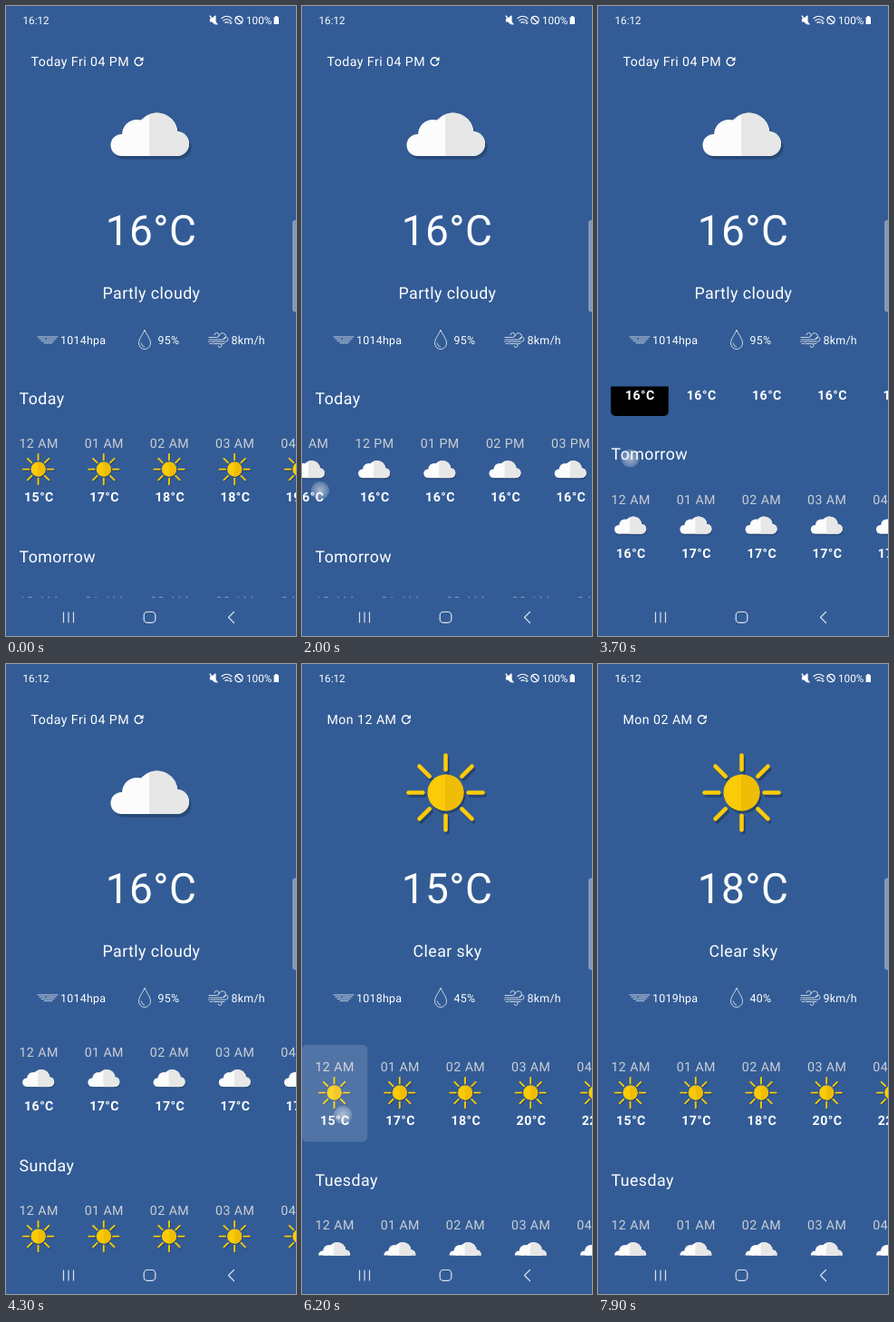
An HTML page for the animation above (8 s loop, 320 px wide and 693 px high).

```html
<!DOCTYPE html>
<html lang="en">
<head>
<meta charset="utf-8">
<title>Weather</title>
<style>
  html, body { margin: 0; width: 100%; height: 100%; overflow: hidden; background: #335c96; }
  svg { display: block; width: 100%; height: 100%; }
  text { font-family: Roboto, sans-serif; fill: #fff; letter-spacing: .44px; text-rendering: geometricPrecision; white-space: pre; }
  .mid { text-anchor: middle; }
  .hour { font-size: 14.2px; fill: #cbced3; }
  .temp { font-size: 14.2px; font-weight: 700; }
  .head { font-size: 17.8px; }
  .info { font-size: 12.4px; letter-spacing: .28px; }
  .bar { font-size: 11.7px; letter-spacing: 0; }
  .line { fill: none; stroke: #fff; stroke-linecap: round; stroke-linejoin: round; }
</style>
</head>
<body>
<svg viewBox="0 0 320 693">
  <defs>
    <clipPath id="list"><rect y="418.5" width="320" height="232"/></clipPath>
    <clipPath id="right"><rect x="-.5" y="-50" width="60" height="100"/></clipPath>
    <radialGradient id="glow">
      <stop offset="0" stop-color="#fff" stop-opacity=".55"/>
      <stop offset=".55" stop-color="#fff" stop-opacity=".34"/>
      <stop offset=".9" stop-color="#fff" stop-opacity=".2"/>
      <stop offset="1" stop-color="#fff" stop-opacity="0"/>
    </radialGradient>
    <g id="puff">
      <circle cx="-31" cy="11.5" r="12"/><circle cx="-14" cy="0" r="16.5"/>
      <circle cx="8" cy="-1" r="23"/><circle cx="30" cy="10" r="13.5"/>
      <rect x="-31" y="0" width="61" height="23.5"/>
    </g>
    <g id="cloud">
      <use href="#puff" x="2.5" y="3.5" opacity=".2"/>
      <use href="#puff" fill="#fcfcfc"/>
      <use href="#puff" fill="#e7e7e7" clip-path="url(#right)"/>
    </g>
    <g id="rain">
      <use href="#cloud" y="-13"/>
      <path class="line" style="stroke:#a9c4e6" stroke-width="2.6" d="M-20 18l-3 6m14-6l-3 6m14-6l-3 6m14-6l-3 6m14-6l-3 6M-26 30l-3 6m14-6l-3 6m14-6l-3 6m14-6l-3 6m14-6l-3 6"/>
    </g>
    <g id="rays" fill="none" stroke-width="4.6" stroke-linecap="round"></g>
    <g id="sun">
      <g transform="translate(2 3)" opacity=".25"><use href="#rays" stroke="#000"/><circle r="20"/></g>
      <use href="#rays" stroke="#fccb08"/>
      <circle r="20" fill="#fccb08"/>
      <circle r="20" fill="#efbd06" clip-path="url(#right)"/>
    </g>
  </defs>

  <rect width="320" height="693" fill="#335c96"/>

  <text class="bar" x="18.5" y="19.5">16:12</text>
  <text class="bar" x="265" y="19.5">100%</text>
  <g class="line" stroke-width="1.2">
    <path d="M225.500 14h2l3.500-3v9l-3.500-3h-2z" fill="#fff"/>
    <path d="M225 11l8 9"/>
    <path d="M238 13.500q5.500-4.500 11 0M240 16q3.500-3 7 0M242 18.300q1.500-1.300 3 0"/>
    <path d="M248 16v3.500m-1.300-1.200l1.300 1.300 1.300-1.300" stroke-width=".9"/>
    <circle cx="257" cy="15.500" r="4.200"/><path d="M254 12.500l6 6"/>
  </g>
  <path d="M297 11h2.600v1.200h1.400v7.800h-5.400v-7.800h1.400z" fill="#fff"/>

  <text id="title" style="font-size:14.200px" x="27.500" y="66"></text>
  <g id="reload">
    <path class="line" stroke-width="1.400" d="M3.200 -2.800A4.300 4.300 0 1 0 4.200 1.200"/>
    <path d="M5.200 -5.200v4.500h-4.500z" fill="#fff"/>
  </g>
  <use id="icon" x="158.500" y="141.500"/>
  <text id="degrees" class="mid" style="font-size:46px" x="160" y="263"></text>
  <text id="sky" class="head mid" x="160.500" y="322.300"></text>

  <g class="line" stroke-width=".8" opacity=".9">
    <path d="M35 364h22M37 366.200h6m2 0h10M39 368.400h14M42 370.600h9"/>
    <path d="M153 356.500c-2 5-6.500 9.500-6.500 14.500a6.500 6.500 0 0 0 13 0c0-5-4.500-9.500-6.500-14.500zM149 371a4.500 4.500 0 0 0 3.500 4"/>
    <path d="M224 364.500h8.500a2.500 2.500 0 1 0-2.500-2.800M224 367h15a3.600 3.600 0 1 0-3.500-4.500M226 369.200h16.500a2.500 2.500 0 1 0-2.300-3.500M223.500 369.200h1M229 371.500h7a2 2 0 1 1-2 2.400M225 371.500h2.500M238 371.500h3"/>
  </g>
  <text id="pressure" class="info" x="60" y="371.700"></text>
  <text id="humidity" class="info" x="167.500" y="371.700"></text>
  <text id="wind" class="info" x="248.500" y="371.700"></text>

  <g clip-path="url(#list)"><g id="days"></g></g>
  <rect id="ripple" y="419" width="72.200" height="106.500" rx="5" fill="#fff"/>

  <g class="line" stroke-width="1.200" opacity=".82">
    <path d="M63.500 667v11M69 667v11M74.500 667v11"/>
    <rect x="152.200" y="666.500" width="12.600" height="11.800" rx="3.800"/>
    <path d="M251.500 666.500l-6 6 6 6"/>
  </g>
  <path d="M320 235.500h-1a3 3 0 0 0-3 3v95a3 3 0 0 0 3 3h1z" fill="#8399ba"/>
  <circle id="finger" r="10.500" fill="url(#glow)"/>
</svg>

<script>
const LOOP = 8000, STEP = 100;
const PITCH = 72.2, NOW_WIDTH = 63.6, NOW_HOUR = 16, DAY_HEIGHT = 174;
const $ = id => document.getElementById(id);

function add(parent, tag, attrs, content) {
  const node = document.createElementNS('http://www.w3.org/2000/svg', tag);
  for (const key in attrs) node.setAttribute(key, attrs[key]);
  if (content) node.textContent = content;
  return parent.appendChild(node);
}

for (let a = 0; a < 360; a += 45)
  add($('rays'), 'path', { d: 'M0 -25.200V-41', transform: `rotate(${a})` });

// Each day: heading, hourly temperatures, icon for an hour
const days = [
  ['Today', [15, 17, 18, 18, 19, 19, 19, 18, 18, 17, 17, ...Array(13).fill(16)],
    h => h < 8 ? 'sun' : h < 19 ? 'cloud' : 'rain'],
  ['Tomorrow', [16, 17, 17, 17, 17], () => 'cloud'],
  ['Sunday', [14, 17, 19, 20, 21], () => 'sun'],
  ['Monday', [15, 17, 18, 20, 22], () => 'sun'],
  ['Tuesday', [16, 16, 17, 17, 17], () => 'cloud']
];

function hourName(h) {
  return String(h % 12 || 12).padStart(2, '0') + (h < 12 ? ' AM' : ' PM');
}

const rows = days.map(([name, temps, iconAt], d) => {
  const day = add($('days'), 'g', { transform: `translate(0 ${d * DAY_HEIGHT})` });
  add(day, 'text', { class: 'head', x: 14.5, y: 437.8 }, name);
  const row = add(day, 'g', {});
  let left = 0;
  temps.forEach((temp, h) => {
    const isNow = d === 0 && h === NOW_HOUR;
    const width = isNow ? NOW_WIDTH : PITCH;
    const x = left + width / 2;
    if (isNow) add(row, 'rect', { x: left, y: 457, width, height: 106.5, rx: 5 });
    add(row, 'text', { class: 'hour mid', x, y: 486.2 }, isNow ? 'Now' : hourName(h));
    add(row, 'use', { href: '#' + iconAt(h), transform: `translate(${x - .5} 509.600) scale(.405)` });
    add(row, 'text', { class: 'temp mid', x: x + .3, y: 545.3 }, temp + '°C');
    left += width;
  });
  return row;
});

// Start time, title, degrees, icon, sky, pressure, humidity, wind
const reports = [
  [0, 'Today Fri 04 PM', 16, 'cloud', 'Partly cloudy', 1014, 95, 8],
  [6100, 'Mon 12 AM', 15, 'sun', 'Clear sky', 1018, 45, 8],
  [6900, 'Mon 01 AM', 17, 'sun', 'Clear sky', 1019, 42, 8],
  [7500, 'Mon 02 AM', 18, 'sun', 'Clear sky', 1019, 40, 9]
];

const linear = p => p;
const coast = p => 1 - (1 - p) ** 3;

function follow(track, t) {
  const next = track.findIndex(key => key[0] > t);
  if (next === 0) return track[0][1];
  if (next < 0) return track[track.length - 1][1];
  const [t0, v0] = track[next - 1], [t1, v1, ease = linear] = track[next];
  return v0 + (v1 - v0) * ease((t - t0) / (t1 - t0));
}

const scrollX = [[600, 0], [1000, 260], [1600, 572, coast], [2000, 822.5],
  [2500, 915.5, coast], [2900, 1092.8], [3100, 1141, coast]];
const scrollY = [[3400, 0], [3800, 150], [4300, 228, coast], [4500, 228], [4800, 350],
  [5100, 405, coast], [5300, 466], [5500, 520], [5800, 560, coast]];

// Touches: start, end, from x and y, to x and y
const touches = [
  [500, 1000, 285, 530, 25, 532], [1600, 2000, 270, 530, 20, 533],
  [2500, 2900, 270, 540, 93, 541], [2900, 3000, 93, 541, 55, 541],
  [3400, 3800, 40, 610, 34, 460], [4500, 4800, 36, 600, 30, 478],
  [5100, 5500, 23, 539, 20, 424],
  [6000, 6200, 45, 496, 45, 496], [6700, 6900, 112, 492, 112, 492], [7300, 7500, 184, 492, 184, 492]
];
const taps = [6000, 6700, 7300];
const rippleFade = [[0, .08], [100, .15], [200, .15], [500, 0]];

let shown;
function showReport(report) {
  if (report === shown) return;
  shown = report;
  const [, title, degrees, icon, sky, pressure, humidity, wind] = report;
  const texts = { title, sky, degrees: degrees + '°C', pressure: pressure + 'hpa',
    humidity: humidity + '%', wind: wind + 'km/h' };
  for (const id in texts) $(id).textContent = texts[id];
  $('icon').setAttribute('href', '#' + icon);
  const end = 27.5 + $('title').getComputedTextLength();
  $('reload').setAttribute('transform', `translate(${end + 10.3} 61)`);
}

function render(t) {
  rows[0].setAttribute('transform', `translate(${-follow(scrollX, t)} 0)`);
  $('days').setAttribute('transform', `translate(0 ${-follow(scrollY, t)})`);
  showReport(reports.findLast(r => t >= r[0]));

  const touch = touches.findLast(([start, end]) => t >= start && t <= end);
  $('finger').setAttribute('opacity', touch ? 1 : 0);
  if (touch) {
    const [start, end, x0, y0, x1, y1] = touch, p = (t - start) / (end - start);
    $('finger').setAttribute('transform', `translate(${x0 + (x1 - x0) * p} ${y0 + (y1 - y0) * p})`);
  }

  const tap = taps.findLastIndex(start => t >= start);
  $('ripple').setAttribute('x', Math.max(tap, 0) * PITCH);
  $('ripple').setAttribute('opacity', tap < 0 ? 0 : follow(rippleFade, t - taps[tap]));
}

// The screen refreshes ten times a second
const begin = performance.now();
function frame() {
  const t = (performance.now() - begin) % LOOP;
  render(Math.floor(t / STEP) * STEP);
  requestAnimationFrame(frame);
}
frame();
</script>
</body>
</html>
```
